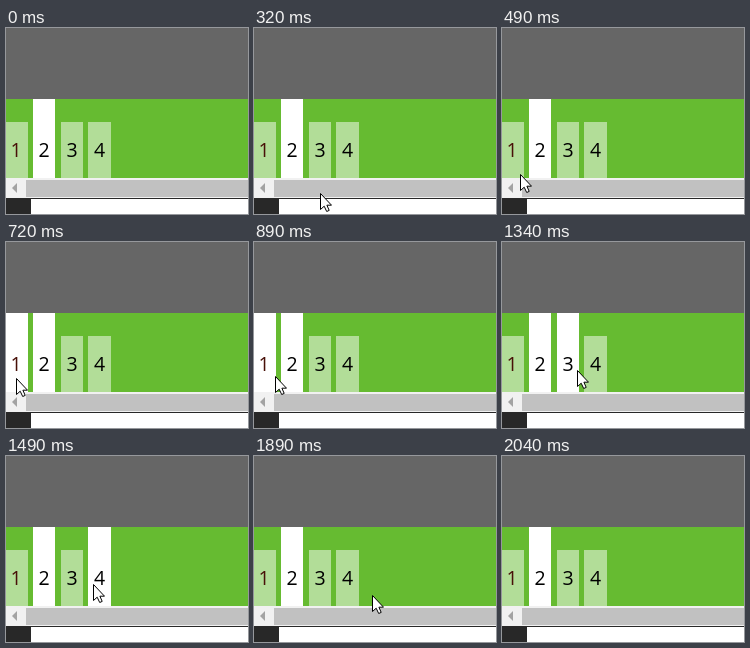
An HTML page that plays this animation: 242 px wide and 186 px high, repeating every 2500 ms.

```html
<!DOCTYPE html>
<html lang="en">
<head>
<meta charset="utf-8">
<title>Tab hover</title>
<style>
  html, body { margin: 0; width: 100%; height: 100%; overflow: hidden; background: #fff; }
  .stage { position: relative; width: 242px; height: 186px; overflow: hidden; background: #666; }
  .stage > * { position: absolute; }

  .bar { left: 0; top: 71px; width: 242px; height: 79px; background: #66bb31; }
  .tab {
    position: absolute; left: var(--x); top: 23px; bottom: 0; width: var(--w, 22px);
    background: #b2dd98;
  }
  .tab span {
    position: absolute; left: 0; right: 0; bottom: 14px; height: 28px;
    font: 19.5px/28px "Open Sans", "Noto Sans", sans-serif; text-align: center; color: #000;
  }
  .tab.current { top: 0; background: #fff; }
  .tab.first span { right: 2px; color: #481008; }

  .scroll { left: 0; top: 150px; width: 242px; height: 20px; background: #f1f1f1; }
  .arrow {
    position: absolute; left: 6px; top: 5px; border: solid transparent;
    border-width: 5px 5px 5px 0; border-right-color: #a3a3a3;
  }
  .thumb { position: absolute; left: 20px; right: 0; top: 2px; height: 17px; background: #c1c1c1; }
  .below { left: 0; top: 170px; width: 242px; height: 16px; background: #282828; }
  .page { position: absolute; left: 25px; top: 1px; right: 0; bottom: 0; background: #fff; }

  svg { left: 0; top: 0; overflow: visible; fill: #fff; stroke: #000; stroke-linejoin: round; }

  .first, .third, .fourth, .thumb, .pointer, .resize { animation: 2.5s step-end infinite; }
  .first { animation-name: first; }
  .third { animation-name: third; }
  .fourth { animation-name: fourth; }
  .thumb { animation-name: thumb; }
  .pointer { animation-name: pointer; }
  .resize { animation-name: resize; }

  /* Percentages are milliseconds / 25 */
  @keyframes first {
    0%, 38.8% { top: 23px; background: #b2dd98; }
    22.8% { top: 0; background: #fff; }
  }
  @keyframes third {
    0%, 56.8% { top: 23px; background: #b2dd98; }
    41.6% { top: 0; background: #fff; }
  }
  @keyframes fourth {
    0%, 75.6% { top: 23px; background: #b2dd98; }
    59.6% { top: 0; background: #fff; }
  }
  @keyframes thumb {
    0%, 19.6% { background: #c1c1c1; }
    16.8% { background: #a8a8a8; }
  }
  @keyframes resize {
    0%, 12.8% { visibility: hidden; }
    5.2% { visibility: visible; }
  }
  @keyframes pointer {
    0% { visibility: hidden; transform: translate(66px, 165px); }
    12.8% { visibility: visible; transform: translate(66px, 165px); }
    16.8% { transform: translate(38px, 155px); }
    19.6% { transform: translate(18px, 146px); }
    22.8% { transform: translate(10px, 138px); }
    28.8% { transform: translate(10px, 136px); }
    35.6% { transform: translate(21px, 134px); }
    38.8% { transform: translate(39px, 130px); }
    41.6% { transform: translate(55px, 128px); }
    44.8% { transform: translate(63px, 127px); }
    47.6% { transform: translate(68px, 127px); }
    50.8% { transform: translate(72px, 127px); }
    53.6% { transform: translate(75px, 128px); }
    56.8% { transform: translate(81px, 128px); }
    59.6% { transform: translate(87px, 128px); }
    75.6% { visibility: visible; transform: translate(118px, 139px); }
    78.8% { visibility: visible; transform: translate(162px, 170px); }
    81.6%, 100% { visibility: hidden; transform: translate(162px, 170px); }
  }
</style>
</head>
<body>
<div class="stage">
  <div class="bar">
    <div class="tab first" style="--x: 0px"><span>1</span></div>
    <div class="tab current" style="--x: 27px"><span>2</span></div>
    <div class="tab third" style="--x: 55px"><span>3</span></div>
    <div class="tab fourth" style="--x: 82px; --w: 23px"><span>4</span></div>
  </div>
  <div class="scroll"><div class="arrow"></div><div class="thumb"></div></div>
  <div class="below"><div class="page"></div></div>
  <svg class="resize" width="9" height="23" style="left: 92px; top: 167px">
    <path d="M4.5 .7L8.4 5.5H5.5V17.5H8.4L4.5 22.3L.6 17.5H3.5V5.5H.6Z"/>
  </svg>
  <svg class="pointer" width="12" height="19">
    <path d="M.5 .5V16.5L4.2 13.2L6.7 18.5L9.2 17.4L6.9 12.2H11.5Z"/>
  </svg>
</div>
</body>
</html>
```
